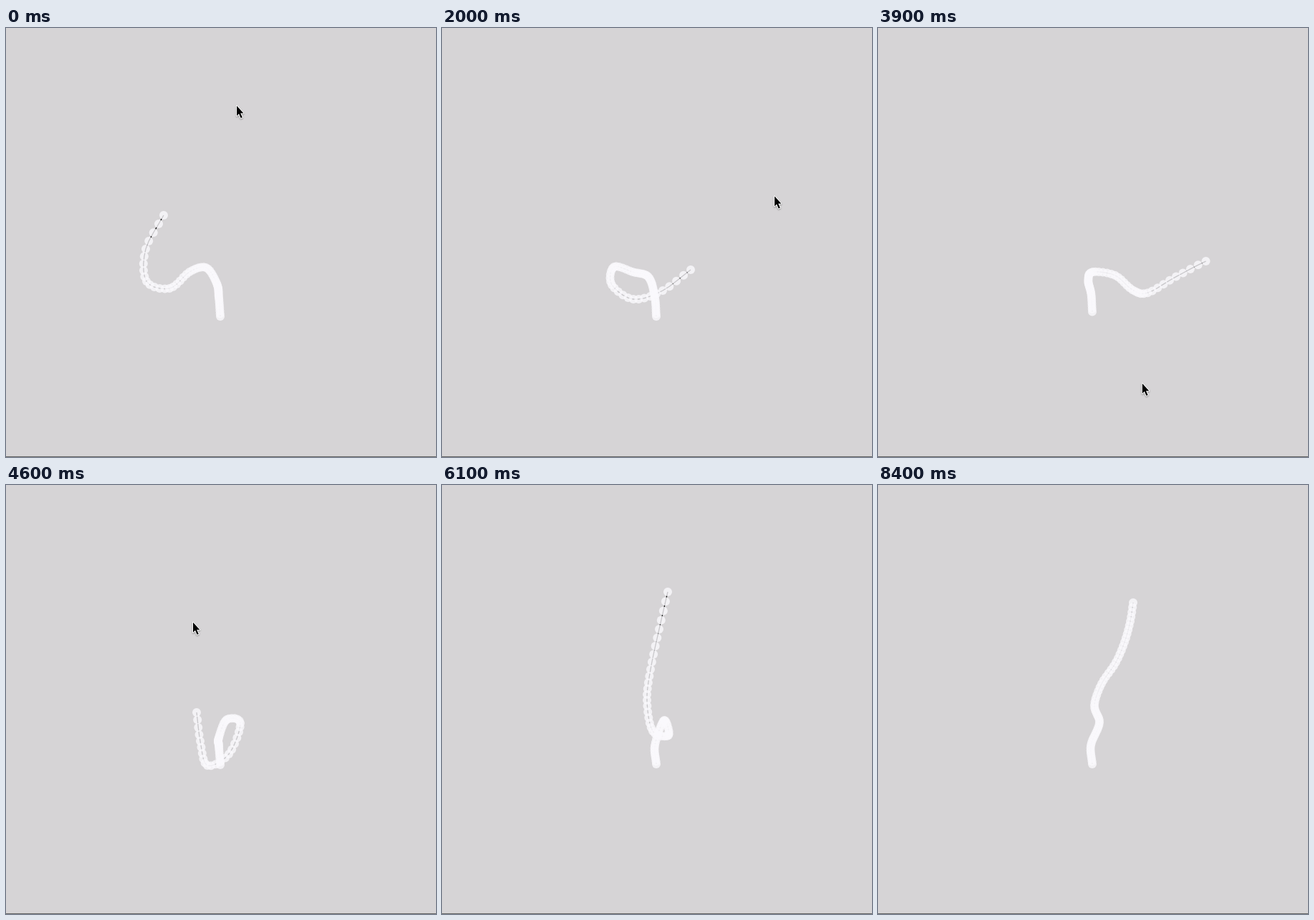
Write an HTML page with a canvas that moves like this. It is 600 px wide and 598 px high and loops after 8500 ms.

```html
<!DOCTYPE html>
<html lang="en">
<head>
<meta charset="utf-8">
<title>Rope follows pointer</title>
<style>
  html, body { margin: 0; width: 100%; height: 100%; overflow: hidden; background: #d6d4d6; }
  canvas { display: block; }
</style>
</head>
<body>
<canvas id="stage" width="600" height="598"></canvas>
<script>
const ctx = document.getElementById('stage').getContext('2d');
const LOOP = 8500, STEP = 100, LAST = 49;
const PULL = 0.4, PULL_DELAY = 250;

// Beads (0 = free end) that a pose places; the others lie on the curve between.
const knots = [0, 4, 9, 14, 20, 26, 33];

// All poses share the stem that rises from the foot.
function pose(time, foot, ...points) {
  const keys = points.map((p, i) => [knots[i], ...p]);
  keys.push([42, 297, foot - 26], [LAST, 299, foot]);
  return { time, keys };
}

const poses = [
  pose(0, 402, [220, 261], [195, 308], [196, 353], [228, 363], [256, 340], [279, 334], [294, 356]),
  pose(900, 402, [257, 261], [268, 296], [242, 310], [224, 332], [244, 346], [273, 337], [290, 351]),
  pose(2000, 402, [347, 337], [308, 366], [267, 378], [237, 358], [240, 333], [266, 340], [288, 347]),
  pose(3100, 402, [465, 159], [418, 199], [370, 249], [329, 290], [291, 323], [268, 337], [282, 345]),
  pose(4600, 390, [266, 317], [271, 357], [281, 391], [311, 375], [327, 332], [308, 327], [297, 352]),
  pose(6100, 389, [315, 149], [303, 201], [291, 257], [286, 300], [294, 343], [316, 349], [310, 328]),
  pose(8400, 389, [356, 164], [352, 190], [344, 219], [332, 247], [312, 277], [302, 307], [309, 331])
];

// Time and place of the pointer; off the stage it is simply not seen.
const pointerPath = [
  [0, 321, 107], [400, 398, 150], [900, 216, 170], [1250, 57, 250], [1500, 220, 472],
  [1800, 512, 330], [2000, 463, 233], [2400, 590, -20], [3100, 640, 100], [3600, 640, 420],
  [3800, 438, 500], [4300, 155, 400], [4600, 260, 190], [4800, 290, 16], [5050, 84, 150],
  [5250, 230, 390], [5450, 456, 250], [5700, 380, -30], [6100, 330, -60],
  [6700, 480, -160], [7100, 640, 180], [8400, 640, 160]
];

// Cubic Hermite curve through keys of the form [position, x, y].
function spline(keys, p) {
  const end = keys.length - 1;
  p = Math.min(Math.max(p, keys[0][0]), keys[end][0]);
  let i = 0;
  while (i < end - 1 && p > keys[i + 1][0]) i++;
  const a = keys[i], b = keys[i + 1], span = b[0] - a[0], s = (p - a[0]) / span;
  const slope = (j, d) => {
    const l = keys[Math.max(j - 1, 0)], r = keys[Math.min(j + 1, end)];
    return (r[d] - l[d]) / (r[0] - l[0]) * span;
  };
  return [1, 2].map(d =>
    a[d] + (b[d] - a[d]) * s * s * (3 - 2 * s) +
    slope(i, d) * s * (1 - s) ** 2 -
    slope(i + 1, d) * s * s * (1 - s));
}

const mix = (a, b, s) => a.map((v, d) => v + (b[d] - v) * s);

// Between poses the free end swings towards where the pointer was a moment ago.
function ropeAt(t) {
  let i = 0;
  while (i < poses.length - 2 && t > poses[i + 1].time) i++;
  const a = poses[i], b = poses[i + 1], s = (t - a.time) / (b.time - a.time);
  const rope = Array.from({ length: LAST + 1 }, (_, n) =>
    mix(spline(a.keys, n), spline(b.keys, n), s));
  const target = spline(pointerPath, t - PULL_DELAY), tip = rope[0];
  const swing = target.map((v, d) => (v - tip[d]) * PULL * Math.sin(Math.PI * s));
  return rope.map((p, n) => p.map((v, d) => v + swing[d] * (1 - n / LAST) ** 3));
}

function drawRope(t) {
  const rope = ropeAt(t);
  ctx.beginPath();
  rope.forEach(p => ctx.lineTo(...p));
  ctx.strokeStyle = '#000';
  ctx.lineWidth = 1.3;
  ctx.lineJoin = 'round';
  ctx.stroke();
  ctx.fillStyle = 'rgba(250, 249, 252, .8)';
  for (const [x, y] of rope) {
    ctx.beginPath();
    ctx.arc(x, y, 6, 0, 2 * Math.PI);
    ctx.fill();
  }
}

const arrow = new Path2D('M1 1.5V15.5L4 12.6L6.6 18.6L8.8 17.7L6.2 11.8H10.4Z');

function drawPointer(t) {
  ctx.save();
  ctx.translate(...spline(pointerPath, t));
  ctx.shadowColor = 'rgba(0, 0, 0, .35)';
  ctx.shadowBlur = 2;
  ctx.shadowOffsetY = 1;
  ctx.strokeStyle = '#fff';
  ctx.lineWidth = 2;
  ctx.stroke(arrow);
  ctx.shadowColor = 'transparent';
  ctx.fillStyle = '#000';
  ctx.fill(arrow);
  ctx.restore();
}

function draw() {
  const t = Math.floor(performance.now() % LOOP / STEP) * STEP;
  ctx.fillStyle = '#d6d4d6';
  ctx.fillRect(0, 0, 600, 598);
  ctx.fillStyle = '#666';
  ctx.fillRect(0, 597, 600, 1);
  drawRope(t);
  drawPointer(t);
  requestAnimationFrame(draw);
}
draw();
</script>
</body>
</html>
```
